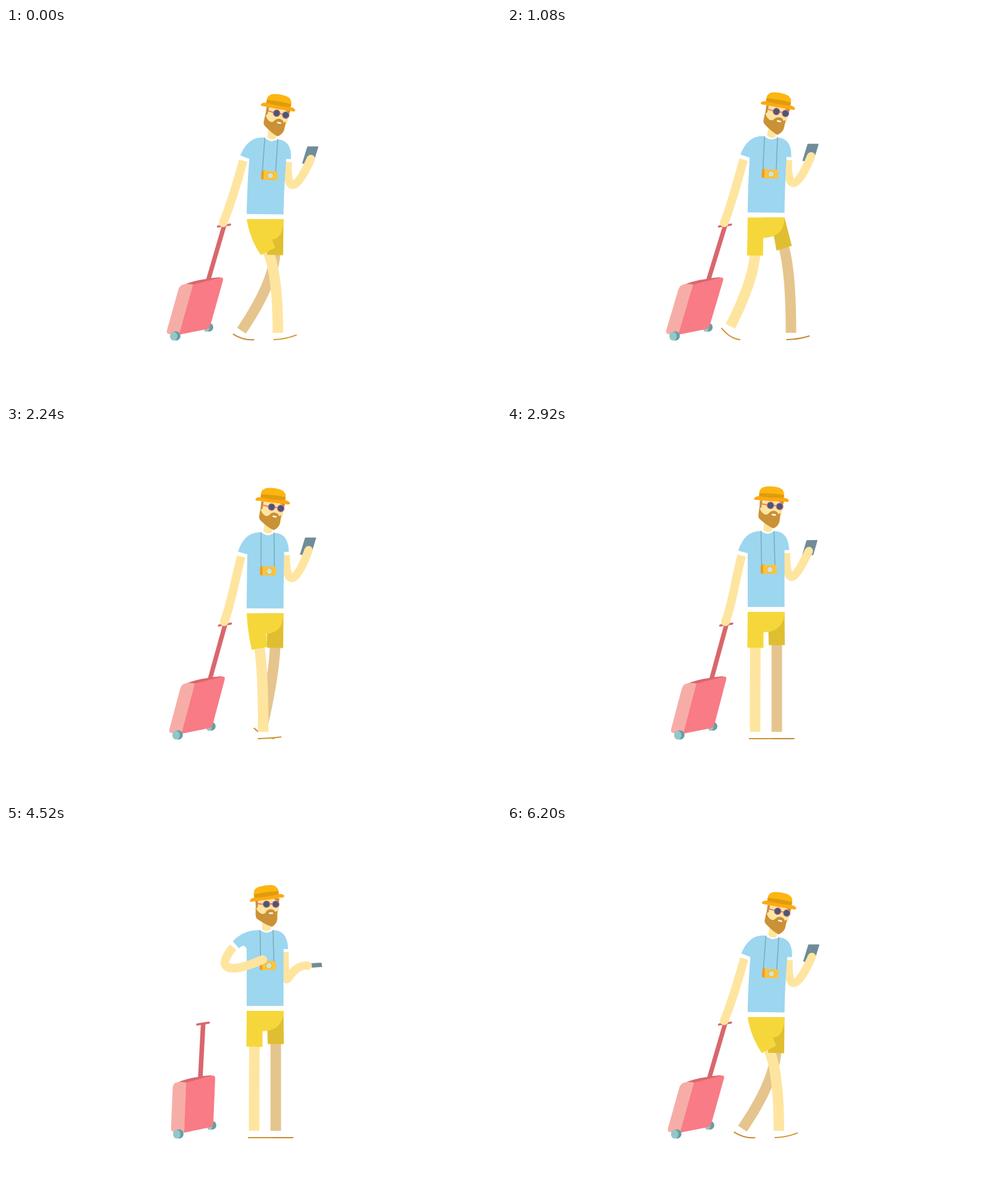
An HTML page with a canvas for the animation above (6.24 s loop, 800 by 600 pixels).

```html
<!DOCTYPE html>
<html lang="en">
<head>
<meta charset="utf-8">
<title>Traveller</title>
<style>
  html, body { margin: 0; width: 100%; height: 100%; overflow: hidden; background: #fff; }
  canvas { display: block; }
</style>
</head>
<body>
<canvas id="stage" width="800" height="600"></canvas>
<script>
const ctx = document.getElementById('stage').getContext('2d');
const LOOP = 6240, TICK = 40, STRIDE = 1800;
const SKIN = '#fee59f', SHIRT = '#9dd6ef', BROWN = '#cb9136', SLATE = '#708c99';
const PINK = '#f87b85', PALE = '#f7ada7', RED = '#d8676d', TEAL = '#62a0a4', MIST = '#95c6c7';
const NEAR = { hip: 402, reach: .573, phase: .9, stand: 401, step: 0, color: SKIN, sole: '#d0962f' };
const FAR = { hip: 436, reach: .52, phase: .4, stand: 436, step: 1, color: '#e5c58d', sole: '#c48a38' };

const { abs, cos, sin, hypot, PI } = Math;
const clamp = x => Math.max(0, Math.min(1, x));
const ramp = (t, a, b) => { const u = clamp((t - a) / (b - a)); return u * u * (3 - 2 * u); };
const hump = (t, a, b) => sin(PI * clamp((t - a) / (b - a)));
const mix = (a, b, k) => a + (b - a) * k;
const blend = (p, q, k) => [mix(p[0], q[0], k), mix(p[1], q[1], k)];
const add = (p, q, k = 1) => [p[0] + q[0] * k, p[1] + q[1] * k];

const fill = (color, d) => { ctx.fillStyle = color; ctx.fill(new Path2D(d)); };
const line = (color, width, d, cap = 'butt') => {
  ctx.strokeStyle = color;
  ctx.lineWidth = width;
  ctx.lineCap = cap;
  ctx.lineJoin = 'round';
  ctx.stroke(new Path2D(d));
};
const disc = (color, x, y, rx, ry = rx) => {
  ctx.fillStyle = color;
  ctx.beginPath();
  ctx.ellipse(x, y, rx, ry, 0, 0, 2 * PI);
  ctx.fill();
};
const group = ([x, y], angle, draw) => {
  ctx.save();
  ctx.translate(x, y);
  ctx.rotate(angle);
  draw();
  ctx.restore();
};

// How far the traveller is into each action, 0 to 1
function actions(t) {
  const back = ramp(t, 5600, 6200);
  const u = t % (STRIDE / 2) / (STRIDE / 2);
  const warped = u < .62 ? u / 1.24 : .5 + (u - .62) / .76;
  const sway = t < STRIDE ? 5.5 * (1 - cos(2 * PI * warped)) : 0;
  const walk = 1 - ramp(t, 1800, 2440) + back;
  return {
    walk, sway,
    drop: 10 * walk - sway,
    stand: ramp(t, 1800, 2560) - ramp(t, 5640, 6200),
    look: ramp(t, 2680, 3600) - back,
    snap: ramp(t, 3920, 4520) - ramp(t, 4760, 5520),
    upright: ramp(t, 3920, 4720) - back,
    recoil: hump(t, 3920, 4480) ** 2,
    reach: ramp(t, 4880, 5520) - back
  };
}

// Curls the upper body around a spine that rises from the waist
const bender = (curve, drop) => (x, y) => {
  const w = (293 - y) / 120, angle = curve * (.1 + .9 * w), dx = x - 418;
  const spine = 418 + 120 * curve * (.1 * w + .45 * w * w);
  return { angle, point: [spine + dx * cos(angle), y + drop + dx * sin(angle)] };
};

function drawCase(dx, hx) {
  const skew = (hx - 312 - dx) / 164;
  disc(TEAL, 333 + dx, 484, 7);
  disc(MIST, 329 + dx, 485, 4.5, 6.5);
  ctx.save();
  ctx.transform(1, 0, -skew, 1, dx + skew * 482, 0);
  line(RED, 7.5, 'M311 408L312 320');
  line(RED, 3.6, 'M302.5 321L321 318', 'round');
  fill(RED, 'M269 419Q280 408 328 403L332 406L289 417Z');
  fill(PALE, 'M272 415Q281 413 289 415V496L272 495Q267 494 267 488V424Q267 417 272 415Z');
  fill(PINK, 'M288.5 415L328 404Q335 402 335 409V482Q335 486 331 487L288.5 496Z');
  ctx.restore();
  disc(TEAL, 279.5 + dx, 498, 7.5);
  disc(MIST, 276 + dx, 498.5, 6, 7);
}

// A foot travels evenly back on the ground, then forward in the air
function legPose(leg, t, { drop, stand }) {
  const p = (Math.min(t, STRIDE) / STRIDE + leg.phase) % 1;
  const stepping = leg.step * sin(PI * stand);
  const heelUp = 38 * hump(p, .27, .8), toeUp = 16 * hump(p < .2 ? p + 1 : p, .8, 1.07);
  const x = mix(410 + 49 * (abs(4 * p - 2) - 1), leg.stand, stand);
  const y = 493 - 14 * hump(p, .3, .9) ** 2 * (1 - stand) - 10 * stepping;
  const pitch = (heelUp - toeUp) * (1 - stand) + 22 * stepping;
  const kx = Math.max(x, leg.hip - 2) + 18 * hump(p, .5, .9) * (1 - stand);
  const hip = [leg.hip, 310 + drop], knee = [kx, 392 + .35 * Math.max(0, kx - x)];
  const dir = add(knee, hip, -1), hem = add(hip, dir, leg.reach);
  const side = [dir[1], -dir[0]], half = 13 / hypot(...dir);
  return { knee, hem, dir, pitch, ankle: [x, y], left: add(hem, side, -half), right: add(hem, side, half) };
}

function drawLeg(leg, pose) {
  const a = pose.pitch * PI / 180, [ax, ay] = pose.ankle;
  const spot = (x, y) => [ax + x * cos(a) - y * sin(a), Math.min(504, ay + x * sin(a) + y * cos(a))];
  const heel = spot(-10, 11), toe = spot(28.5, 11), middle = blend(heel, toe, .5);
  const sag = [middle[0], Math.min(506, middle[1] + abs(pose.pitch) * .24)];
  const sole = `${heel}Q${sag} ${toe}`;
  fill('#fff', `M${spot(9, -1)}L${spot(-9, -1)}L${sole}Q${spot(24, 4)} ${spot(9, -1)}Z`);
  line(leg.sole, 2, 'M' + sole);
  line(leg.color, 17, `M${add(pose.hem, pose.dir, -.07)}Q${pose.knee} ${pose.ankle}`);
}

function drawShorts(near, far, drop) {
  const top = 299 + drop, swing = (near.knee[0] - 402) * .4;
  const inner = 422.5 + (far.knee[0] - 436) * .4;
  fill('#dfbf31', `M415 ${top}H448.5L${far.right}L${far.left}L${inner} ${331 + drop}Z`);
  fill('#f6d73b', `M389 ${top}H448.5Q448 ${331 + drop} ${415 + swing} ${332 + drop}` +
    `L${near.right}L${near.left}Q${389 + swing * .3} ${330 + drop} 389 ${top}Z`);
}

function drawPhoneArm(B, { look, reach }, lean) {
  const lift = 9 * reach;
  const start = B(mix(451, 450, look), 204);
  const c1 = B(452, mix(256, 290, look) - lift);
  const c2 = B(mix(468, 452, look), mix(254, 222, look) - lift);
  const hand = B(488, mix(195, 226, look) - lift);
  const corner = blend([-5, -19], [6, -3], look);
  const across = blend([16, 0], [15, -1], look), down = blend([-8, 26], [1, 5], look);
  group(hand, lean * .8, () => {
    const far = add(corner, across);
    const phone = `M${corner}L${far}L${add(far, down)}L${add(corner, down)}Z`;
    fill(SLATE, phone);
    line(SLATE, 2, phone);
  });
  line(SKIN, 13.5, `M${start}C${c1} ${c2} ${hand}`);
  disc(SKIN, ...hand, 6.5);
}

function drawShirt(B) {
  const side = (x, y0, y1) => Array.from({ length: 9 }, (_, i) => B(x, mix(y0, y1, i / 8))).join('L');
  fill(SHIRT, `M${B(434, 168.5)}Q${B(455, 170)} ${B(456, 199)}L${B(444, 199)}L${B(440, 205)}Z`);
  fill(SHIRT, `M${B(409, 168.5)}Q${B(398, 168)} ${B(389, 178)}L${side(389, 180, 291)}` +
    `L${side(448.5, 291, 180)}Q${B(443, 170)} ${B(433, 168.5)}Q${B(421, 174)} ${B(409, 168.5)}Z`);
  fill('#fff', `M${B(410, 167)}Q${B(421, 178)} ${B(432, 167)}Z`);
}

function drawCamera(bend, hang) {
  const B = (x, y) => bend(x, y).point;
  const { point, angle } = bend(423, 225.5 + hang);
  line('#7aa8b7', 1.4, `M${B(410.5, 168)}L${B(411.5, 219 + hang)}M${B(431.5, 168)}L${B(433, 219 + hang)}`);
  group(point, angle, () => {
    fill('#ef9d1c', 'M-12 -7Q-13 -7 -13 -5V5Q-13 7 -11 7.5H-7V-7.5Z');
    fill('#fbc43a', 'M-9 -7H11Q13 -7 13 -5V5Q13 7.5 11 7.5H-9Z');
    disc('#f0b02c', 2, .5, 5.4);
    disc('#d0e4d6', 2, .5, 4.4);
  });
}

function drawCaseArm(B, { snap, reach }, hx) {
  const a = .27 + .58 * snap;
  const dir = [-sin(a), cos(a)], normal = [-cos(a), -sin(a)];
  const end = [381 - 9.5 * snap - 3 * reach, 202 - 10 * snap];
  const outer = B(...add(end, normal, 7.5)), inner = B(...add(end, normal, -7.5));
  const start = B(...add(end, dir, 6));
  const hand = blend([hx - 2, 315 - 5 * reach], [415, 216], snap);
  const c1 = add(start, blend([-10, 36], [-30, 37], snap));
  const c2 = add(hand, blend([11 + 10 * reach, -27], [-54, 24], snap));
  fill(SHIRT, `M${B(409, 168.5)}Q${B(384, 168)} ${outer}L${inner}` +
    `Q${B(388, 203 - 16 * snap)} ${B(390, 205)}L${B(405, 205)}Z`);
  line('#fff', 15, `M${B(...add(end, dir, .5))}L${start}`);
  line(SKIN, 14, `M${start}C${c1} ${c2} ${hand}`);
  disc(SKIN, ...hand, 7);
}

// The head is laid out upright and turned about the base of the neck
function drawHead(pivot, nod, tip) {
  group(pivot, nod * PI / 180, () => {
    ctx.translate(-421, -168);
    fill(SKIN, 'M414 150H428V167Q421 173 414 167Z');
    fill(SKIN, 'M404 114H441V136L438 146H404Z');
    fill(BROWN, 'M403 120H407V131L404 134Z');
    fill(BROWN, 'M434 117H442L441 124Q438 120 434 119Z');
    fill(BROWN, 'M403.5 131Q406 139 413 142Q418 143 420 139Q423 134.5 428 134.5Q434 135 435 139' +
      'L438.5 137V151Q437 159 430 163Q420 160 407 151Q403 148 403.5 143Z');
    line('#fff', 2.4, 'M426 141H430.5', 'round');
    line('#e2747c', 1.8, 'M405 125.5L416 126.5M425 126H432');
    for (const x of [421, 436]) {
      disc('#e2747c', x, 126.5, 6.1);
      disc('#46597a', x, 126.5, 5);
    }
    group([421, 112], (tip - 8) * PI / 180, () => {
      fill('#fdb510', 'M-20 3V-7Q-18 -14.5 -9 -15.5Q0 -17 9 -15.5Q18 -14.5 20 -6V3Z');
      fill('#e09b0d', 'M-20 -4Q0 -6 20 -4V3H-20Z');
      fill('#fda911', 'M-28 5Q-26 1 -20 1Q0 3 20 1Q27 1 28.5 5Q28 8 22 7Q0 8 -22 7Q-28 8 -28 5Z');
    });
  });
}

function draw(t) {
  ctx.fillStyle = '#fff';
  ctx.fillRect(0, 0, 800, 600);

  const act = actions(t), { walk, drop, look, reach } = act;
  const lean = -.35 * reach, bend = bender(lean + drop * .011, drop);
  const B = (x, y) => bend(x, y).point;
  const near = legPose(NEAR, t, act), far = legPose(FAR, t, act);
  const handle = 355 - 2 * walk - 43 * act.upright;
  const facing = 1 - look;

  drawCase(-5 * walk - act.sway - 8 * act.recoil, handle);
  drawLeg(FAR, far);
  drawLeg(NEAR, near);
  drawShorts(near, far, drop);
  drawPhoneArm(B, act, lean);
  drawShirt(B);
  drawCamera(bend, 5.5 * facing - 3 * walk);
  drawCaseArm(B, act, handle);
  drawHead(B(421, 168), 8 * facing + 4 * walk - 8 * reach, 6 * facing);
}

function frame() {
  draw(Math.floor(performance.now() % LOOP / TICK) * TICK);
  requestAnimationFrame(frame);
}
frame();
</script>
</body>
</html>
```
